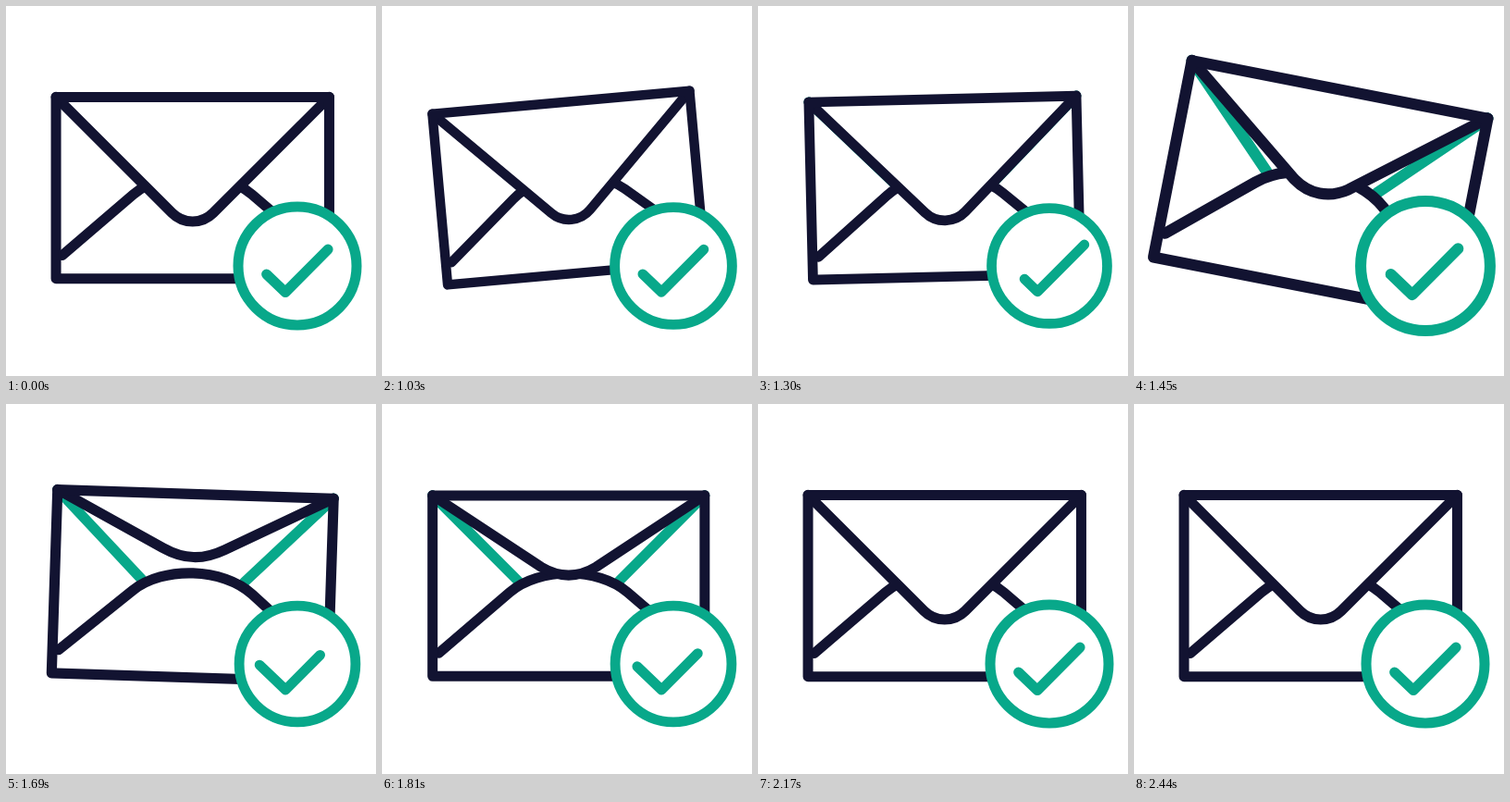
Recreate the animation shown at these times as an HTML page. Size 400 px wide and 400 px high, loop 2.47 s.

```html
<!DOCTYPE html>
<html lang="en">
<head>
<meta charset="utf-8">
<title>Mail delivered</title>
<style>
  html, body { margin: 0; width: 100%; height: 100%; overflow: hidden; background: #fff; }
  svg { display: block; width: 100vw; height: 100vh; }
  path, circle { fill: none; stroke-width: 11; stroke-linecap: round; stroke-linejoin: round; }
  .navy { stroke: #121331; }
  .green { stroke: #08a88a; }
  .solid { fill: #fff; }
</style>
</head>
<body>
<svg viewBox="0 0 400 400">
  <g id="envelope">
    <path id="folds" class="green" d="M-147.7-98.3L-55-5.6M147.7-98.3L55-5.6"/>
    <path class="navy" d="M-141 73L-64 7C-32-20.4 32-20.4 64 7L141 73"/>
    <path id="flap" class="navy solid"/>
    <path class="navy" d="M-147.7-98.1H147.7V98.1H-147.7Z"/>
  </g>
  <g id="badge">
    <circle class="green solid" r="64"/>
    <path id="check" class="green"/>
  </g>
</svg>
<script>
const LOOP = 2470, START = 1030, STEP = 30;

// [time in ms, value]; a half-cosine eases between neighbours
const tracks = {
  angle: [[885, 0], [1170, -10], [1465, 11.2], [1772, 0]],
  size: [[885, 1], [1170, .893], [1465, 1.1045], [1770, .993], [1940, 1.0155], [2110, 1]],
  badge: [[985, 1], [1185, .92], [1490, 1.1], [1740, .97], [1940, 1.018], [2120, 1]],
  slide: [[1030, 0], [1240, 9], [1665, -11.5], [2130, 0]],
  open: [[1284, 0], [1640, 1.03], [2095, 0]]
};

const $ = id => document.getElementById(id);
const [envelope, folds, flap, badge, check] =
  ['envelope', 'folds', 'flap', 'badge', 'check'].map($);
const mix = (a, b, p) => a + (b - a) * p;

function valueAt(keys, t) {
  if (t <= keys[0][0]) return keys[0][1];
  const i = keys.findIndex(k => k[0] > t);
  if (i < 0) return keys[keys.length - 1][1];
  const [t0, a] = keys[i - 1], [t1, b] = keys[i];
  return mix(a, b, (1 - Math.cos(Math.PI * (t - t0) / (t1 - t0))) / 2);
}

function flapPath(u) {
  const x = mix(22.2, 33, u), y = mix(27.15, -39.6, u);
  const hx = x - mix(12.3, 23, u), hy = y + mix(12.3, 11.8, u);
  return `M-147.7-98.3L${-x} ${y}C${-hx} ${hy} ${hx} ${hy} ${x} ${y}L147.7-98.3`;
}

// Both ends of the tick slide along its two arms
function checkPath(s) {
  const short = 28.3 - s, long = 65.4 + s;
  return `M${-13 - .72 * short} ${28.5 - .69 * short}L-13 28.5` +
    `L${-13 + .705 * long} ${28.5 - .71 * long}`;
}

function draw(time) {
  let t = time % LOOP;
  t = t < START ? 0 : START + Math.floor((t - START) / STEP) * STEP;
  const v = {};
  for (const name in tracks) v[name] = valueAt(tracks[name], t);

  envelope.setAttribute('transform', `translate(201.75 196.6) rotate(${v.angle}) scale(${v.size})`);
  badge.setAttribute('transform', `translate(315 281) scale(${v.badge})`);
  flap.setAttribute('d', flapPath(v.open));
  check.setAttribute('d', checkPath(v.slide));
  folds.style.visibility = v.open > .003 ? 'visible' : 'hidden';
}

const origin = performance.now();
function tick() {
  draw(performance.now() - origin);
  requestAnimationFrame(tick);
}
tick();
</script>
</body>
</html>
```
